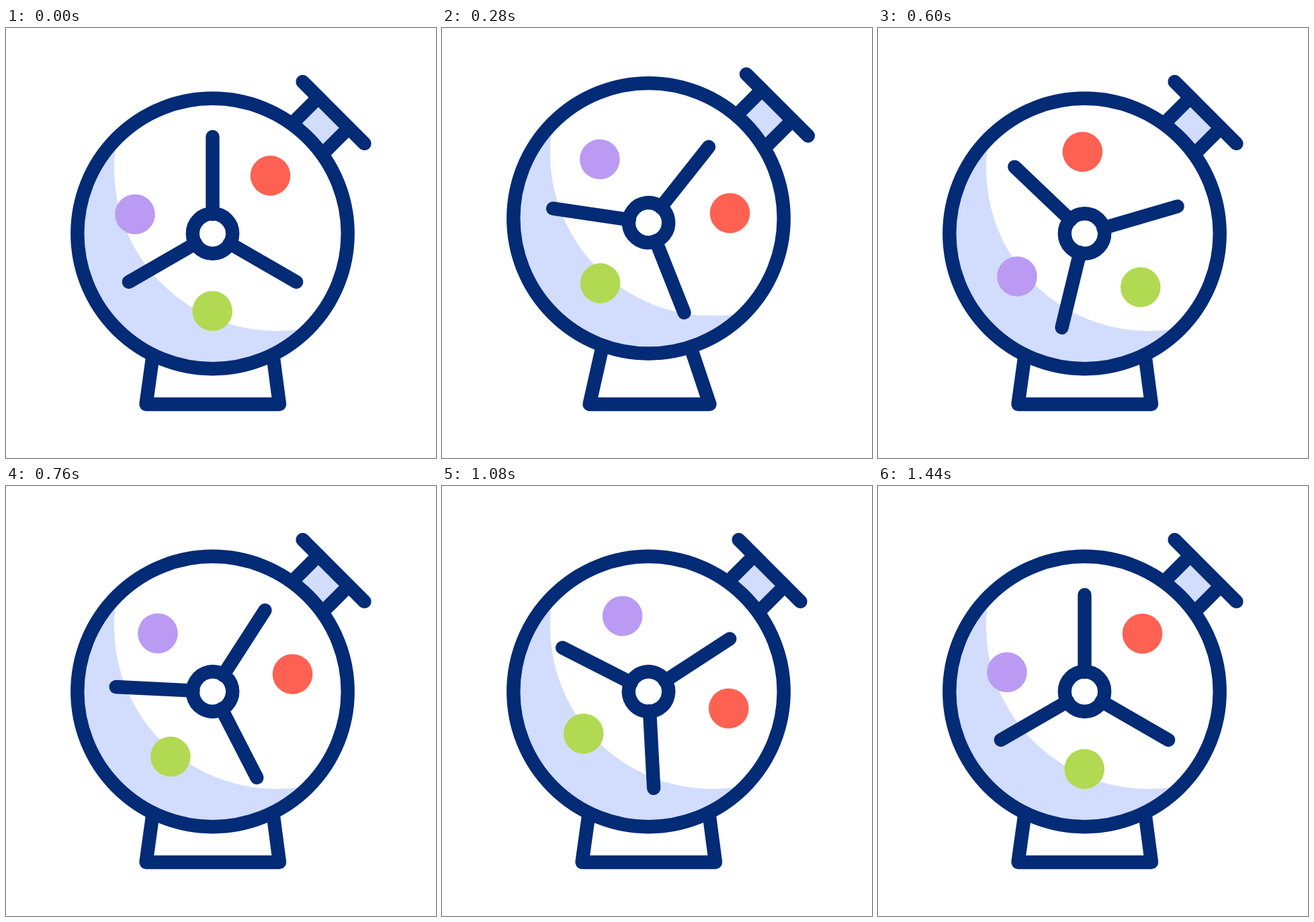
Recreate the animation shown at these times as an HTML page with a canvas. Size 640 by 640 pixels, loop 1480 ms.

```html
<!DOCTYPE html>
<html lang="en">
<head>
<meta charset="utf-8">
<title>Spinning drum</title>
<style>
  html, body { margin: 0; width: 100%; height: 100%; overflow: hidden; background: #fff; }
  canvas { display: block; width: 640px; height: 640px; }
</style>
</head>
<body>
<canvas id="stage" width="640" height="640"></canvas>
<script>
const ctx = document.getElementById('stage').getContext('2d');
const LOOP = 1480, STEP = 40;
const NAVY = '#032b76', PALE = '#d2ddfd', WHITE = '#fff';
const CX = 307.5, CY = 306;

// Each key: [time, value, ease-in handle, ease-out handle]
const SPIN = [[120, 0], [970, 422, 0.4, 0.4], [1440, 360, 0.5, 0.66]];
const JUMP = [[0, 0], [130, 7], [290, -23], [390, 6.3], [480, 0]];
const PLUNGER = [[175, 0], [380, 31], [560, 0, 0.5, 0.5]];
const FOOT = [[130, 0], [280, 1], [390, 0]];
const KNEE = [[130, 0], [280, 1], [440, 0.27], [540, 0]];
const HUB_DELAY = 40;

const BALLS = [
  [86, -86.3, '#ff6152'],
  [-115.5, -28.7, '#bb9af3'],
  [-0.3, 115.3, '#b1d952']
];

// Cubic bezier easing with flat ends
function ease(u, x1 = 0.36, x2 = 0.64) {
  let lo = 0, hi = 1;
  for (let i = 0; i < 24; i++) {
    const s = (lo + hi) / 2, r = 1 - s;
    if (3 * r * r * s * x1 + 3 * r * s * s * x2 + s * s * s < u) lo = s;
    else hi = s;
  }
  return lo * lo * (3 - 2 * lo);
}

function valueAt(keys, t) {
  if (t <= keys[0][0]) return keys[0][1];
  for (let i = 1; i < keys.length; i++) {
    const [t0, v0] = keys[i - 1], [t1, v1, x1, x2] = keys[i];
    if (t < t1) return v0 + (v1 - v0) * ease((t - t0) / (t1 - t0), x1, x2);
  }
  return keys[keys.length - 1][1];
}

function line(points, close) {
  ctx.beginPath();
  points.forEach(([x, y]) => ctx.lineTo(x, y));
  if (close) ctx.closePath();
  ctx.stroke();
}

function disc(x, y, r, fill) {
  ctx.beginPath();
  ctx.arc(x, y, r, 0, 2 * Math.PI);
  ctx.fillStyle = fill;
  ctx.fill();
}

function ring(x, y, r) {
  ctx.beginPath();
  ctx.arc(x, y, r, 0, 2 * Math.PI);
  ctx.stroke();
}

function drawBase(t, dy) {
  const foot = valueAt(FOOT, t), knee = valueAt(KNEE, t), top = 480 + dy;
  line([
    [219.6 + 23 * knee, top],
    [208.5 + 11 * foot, 560],
    [407 - 8.5 * foot, 560],
    [396.5 - 32.5 * knee, top]
  ]);
}

function drawPlunger(push) {
  const y = -254.6 - push;
  ctx.save();
  ctx.translate(CX, CY);
  ctx.rotate(Math.PI / 4);
  ctx.fillStyle = PALE;
  ctx.fillRect(-32, y, 64, -180 - y);
  line([[-32, y], [-32, -180]]);
  line([[32, y], [32, -180]]);
  line([[-65, y], [65, y]]);
  ctx.restore();
}

function drawDrum(dy) {
  ctx.save();
  ctx.translate(0, dy);
  disc(CX, CY, 201, PALE);
  ctx.save();
  ctx.clip();
  disc(402.5, 209.5, 241.5, WHITE);
  ctx.restore();
  ring(CX, CY, 201.2);
  ctx.restore();
}

function drawRotor(dy, degrees) {
  ctx.save();
  ctx.translate(CX, CY + dy);
  ctx.rotate(degrees * Math.PI / 180);
  BALLS.forEach(([x, y, color]) => disc(x, y, 29.8, color));
  ring(0, 0, 29.7);
  for (let i = 0; i < 3; i++) {
    line([[0, -29], [0, -144]]);
    ctx.rotate(2 * Math.PI / 3);
  }
  ctx.restore();
}

function draw(t) {
  const dy = valueAt(JUMP, t);
  ctx.fillStyle = WHITE;
  ctx.fillRect(0, 0, 640, 640);
  ctx.strokeStyle = NAVY;
  ctx.lineWidth = 20.4;
  ctx.lineCap = ctx.lineJoin = 'round';
  drawBase(t, dy);
  drawPlunger(valueAt(PLUNGER, t));
  drawDrum(dy);
  drawRotor(valueAt(JUMP, t - HUB_DELAY), valueAt(SPIN, t));
}

const start = performance.now();
function tick() {
  const t = (performance.now() - start) % LOOP;
  draw(Math.floor(t / STEP) * STEP);
  requestAnimationFrame(tick);
}
tick();
</script>
</body>
</html>
```
